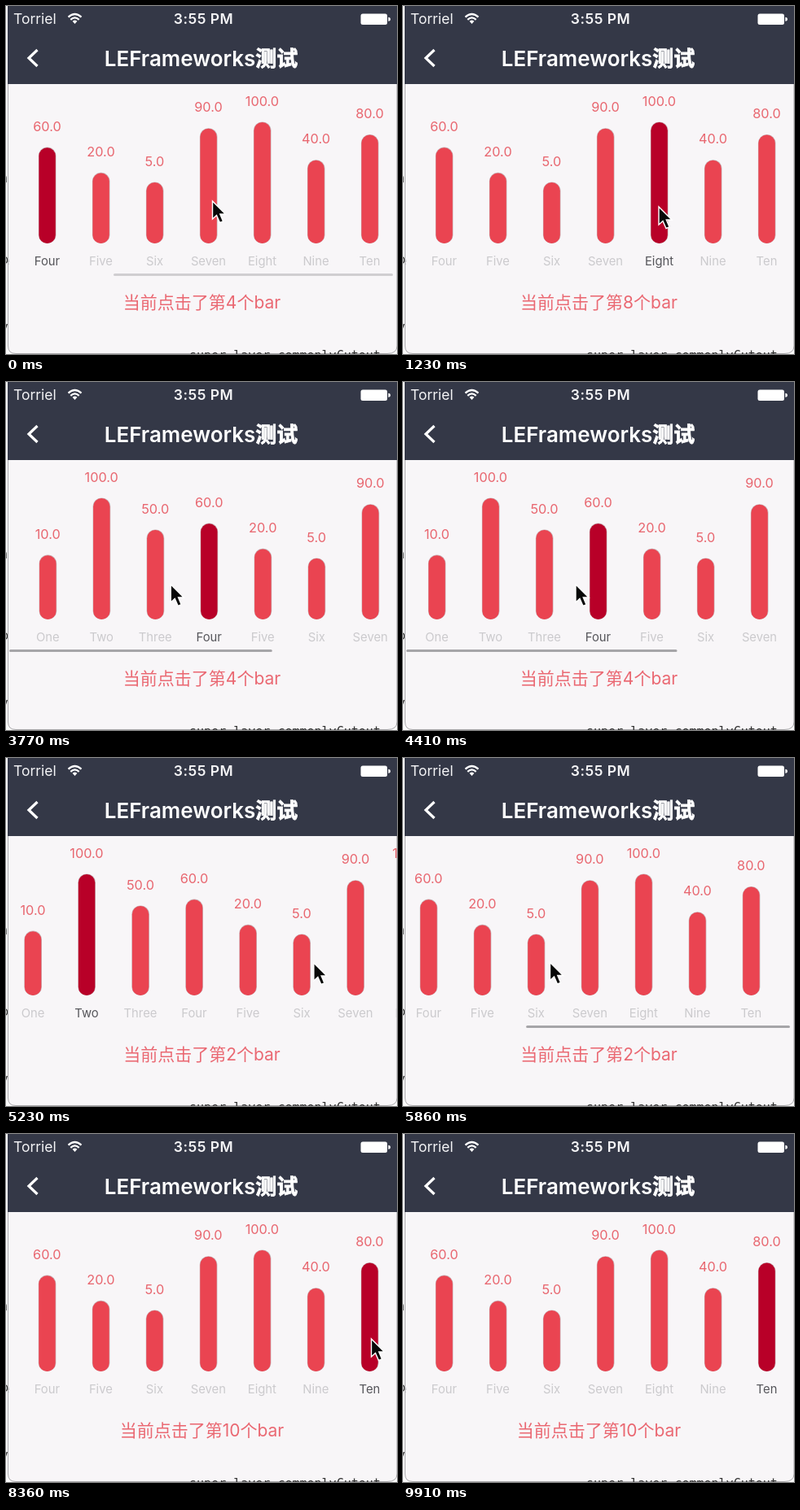
These frames come from a looping animation (480x428 px, 9960 ms). An HTML page:

```html
<!DOCTYPE html>
<html lang="zh">
<head>
<meta charset="utf-8">
<style>
html, body { margin: 0; width: 100%; height: 100%; overflow: hidden; background: #fbfbfb; }
svg { display: block; width: 480px; height: 428px; }
text { font-family: Inter, "Noto Sans CJK SC", "Noto Sans CJK", sans-serif; }
.mid { text-anchor: middle; }
.status { font-size: 17.5px; fill: #f4f4f6; }
.title { font-size: 26px; font-weight: 600; fill: #fff; }
.title tspan { stroke: #fff; stroke-width: 0.8; }
.value { font-size: 16.3px; fill: #e8666f; }
.name { font-size: 14.8px; fill: #cbcacd; }
.edge { fill: #c8b3b7; }
.bar { fill: #ea4451; }
.on .bar { fill: #b80028; }
.on .name { fill: #55555a; }
.msg { font-size: 21px; fill: #ea6872; }
.desk { font: 15px "DejaVu Sans Mono", monospace; fill: #333; }
.red { fill: #a33; }
</style>
</head>
<body>
<svg viewBox="0 0 480 428">
  <defs>
    <clipPath id="view"><rect x="3" y="97" width="477" height="235"/></clipPath>
  </defs>
  <g class="desk">
    <text x="-7" y="217">n</text>
    <text class="red" x="-6" y="236">r</text>
    <text x="-6" y="317">o</text>
    <text class="red" x="-6" y="346">r</text>
    <text x="-6" y="400">v</text>
  </g>
  <path d="M2.5 0V418Q2.5 427.5 12 427.5H468Q480 427.5 480 418V0Z" fill="#f8f6f8" stroke="#aaa9ac"/>
  <text class="desk" x="216" y="435" font-weight="bold">_super layer.commonlyCutout</text>
  <rect x="2" width="478" height="96" fill="#343847"/>

  <text class="status" x="9" y="22">Torriel</text>
  <g fill="none" stroke="#fff" stroke-width="2.2">
    <path d="M76.5 13.6Q84.5 6.4 92.5 13.6M79.3 16.9Q84.5 12 89.7 16.9"/>
    <path d="M81.6 18.8Q84.5 16 87.4 18.8L84.5 22Z" fill="#fff" stroke="none"/>
    <path d="M38.5 54L28 64L38.5 74" stroke-width="3.2"/>
  </g>
  <text class="status mid" x="242.5" y="22" font-weight="600" letter-spacing="0.5">3:55 PM</text>
  <rect x="435.5" y="9.5" width="32.5" height="13.5" rx="2.5" fill="#fff"/>
  <path d="M469.3 13.8Q472 14 472 16.3T469.3 18.8Z" fill="#fff"/>
  <text class="title mid" x="239.5" y="74">LEFrameworks<tspan>测试</tspan></text>

  <g clip-path="url(#view)"><g id="bars"></g></g>
  <rect id="thumb" y="328.9" height="3" rx="1.5" fill="#a6a5a8"/>
  <text id="msg" class="msg mid" x="240.5" y="372"></text>
  <path id="cursor" d="M0 0V22L5 17.5L9 26.5L13 24.8L9.3 16H16Z" fill="#080808" stroke="#fff" stroke-width="1.4"/>
</svg>
<script>
const LOOP = 9960, PITCH = 66, BASE = 292;
const MAX = 178.5;          // scroll range
const MOVE = 500;           // length of a pointer glide or drag
const SPRING = 490;         // time constant of the bounce
const LINGER = 900, FADE = 250;
const CURSOR_END = 9300;
const data = { One: 10, Two: 100, Three: 50, Four: 60, Five: 20, Six: 5, Seven: 90, Eight: 100, Nine: 40, Ten: 80 };

// Each drag is released past its resting place, then springs back.
const drags = [
  { end: -1025, rest: MAX, over: 0 },
  { end: 3850, rest: 0, over: -33 },
  { end: 5750, rest: MAX, over: 24 },
];

// Pointer stops by arrival time; a pick is a click on that bar.
const stops = [
  { t: 0, x: 253.5, y: 240, pick: 4 },
  { t: 1200, x: 314, y: 247, pick: 8 },
  { t: 2400, x: 107.5, y: 246 },
  { t: 2950, x: 50, y: 248, pick: 4 },
  { t: 3850, x: 212, y: 249 },
  { t: 4910, x: 98, y: 250, pick: 2 },
  { t: 5250, x: 380, y: 252 },
  { t: 5750, x: 180.5, y: 251.5 },
  { t: 6400, x: 386.5, y: 260 },
  { t: 7650, x: 448.5, y: 252, pick: 10 },
];

const $ = id => document.getElementById(id);
const clamp = (v, lo = 0, hi = 1) => Math.min(Math.max(v, lo), hi);
const mix = (a, b, p) => a + (b - a) * p;
const ease = p => (1 - Math.cos(Math.PI * clamp(p))) / 2;

function scrollAt(t, i = drags.length - 1) {
  const { end, rest, over } = drags[i];
  const start = end - MOVE;
  if (t >= end) return rest + over * Math.exp((end - t) / SPRING);
  if (i === 0) return rest;
  if (t < start) return scrollAt(t, i - 1);
  return mix(scrollAt(start, i - 1), rest + over, ease((t - start) / MOVE));
}

function thumbAlpha(t) {
  return Math.max(...drags.map(({ end }) =>
    Math.min(clamp((t - end + MOVE) / 90), clamp((end + LINGER + FADE - t) / FADE))));
}

function pointerAt(t) {
  const i = stops.findIndex(s => s.t > t);
  if (i < 0) return stops[stops.length - 1];
  const a = stops[i - 1], b = stops[i];
  const start = Math.max(a.t, b.t - MOVE);
  const p = ease((t - start) / (b.t - start));
  return { x: mix(a.x, b.x, p), y: mix(a.y, b.y, p) };
}

function add(parent, tag, attrs, text = "") {
  const el = document.createElementNS("http://www.w3.org/2000/svg", tag);
  for (const k in attrs) el.setAttribute(k, attrs[k]);
  el.textContent = text;
  return parent.appendChild(el);
}

function pill(parent, cls, x, y, width) {
  add(parent, "rect", { class: cls, x, y, width, height: BASE - y, rx: width / 2 });
}

const bars = Object.entries(data).map(([name, value], i) => {
  const x = 31 + PITCH * i, top = 221 - 0.78 * value;
  const g = add($("bars"), "g", {});
  pill(g, "edge", x - 10.6, top - 0.6, 21.6);
  pill(g, "bar", x - 10.1, top, 20.4);
  add(g, "text", { x, y: top - 20.5, class: "value mid" }, value.toFixed(1));
  add(g, "text", { x, y: 319.3, class: "name mid" }, name);
  return g;
});

function draw(t) {
  const s = scrollAt(t);
  const inside = clamp(s, 0, MAX);
  $("bars").setAttribute("transform", `translate(${-s} 0)`);

  // The thumb shrinks against the edge it is pushed to.
  const thumb = $("thumb");
  thumb.setAttribute("x", 4 + 128 * inside / MAX + Math.max(0, s - MAX));
  thumb.setAttribute("width", 343 - Math.abs(s - inside));
  thumb.setAttribute("opacity", thumbAlpha(t));

  const { pick } = stops.filter(stop => stop.pick && stop.t <= t).pop();
  bars.forEach((g, i) => g.setAttribute("class", i + 1 === pick ? "on" : ""));
  $("msg").textContent = `当前点击了第${pick}个bar`;

  const { x, y } = pointerAt(t);
  $("cursor").setAttribute("transform", `translate(${x} ${y})`);
  $("cursor").setAttribute("opacity", t < CURSOR_END ? 1 : 0);
}

const start = performance.now();
function tick() {
  draw((performance.now() - start) % LOOP);
  requestAnimationFrame(tick);
}
tick();
</script>
</body>
</html>
```
